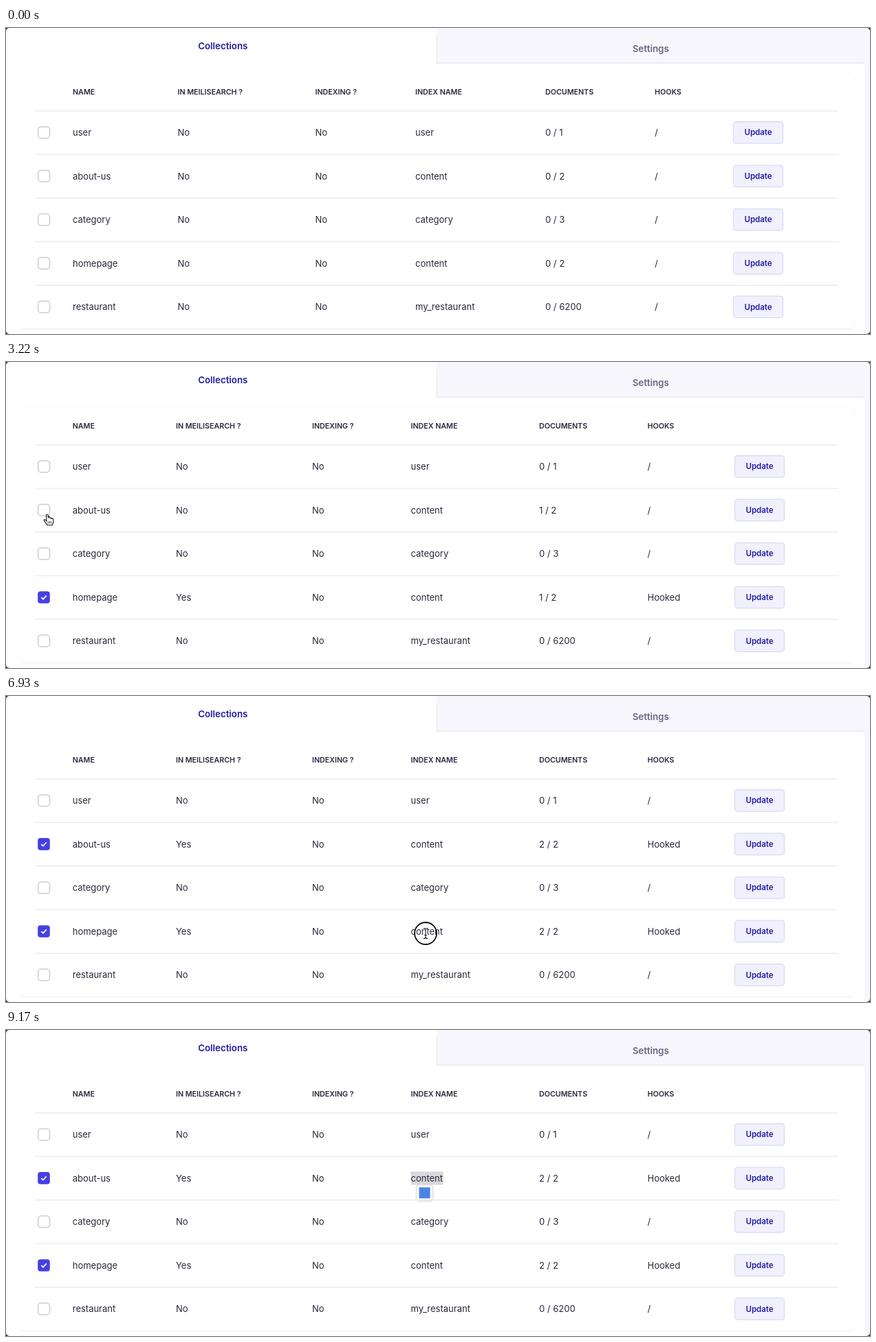
An HTML page with a canvas for the animation above (9.52 s loop, 1256 by 446 pixels).

```html
<!DOCTYPE html>
<html lang="en">
<head>
<meta charset="utf-8">
<title>Collections</title>
<style>
  html, body { margin: 0; width: 100%; height: 100%; overflow: hidden; background: #fff; }
  canvas { display: block; width: 1256px; height: 446px; }
</style>
</head>
<body>
<canvas id="stage" width="1256" height="446"></canvas>
<script>
const ctx = document.getElementById('stage').getContext('2d');
const LOOP = 9520, STEP = 70;
const INK = '#28283c', INDIGO = '#211c9f', LAVENDER = '#f7f6fc', RULE = '#ededf3';
const FIRST_ROW = 152.3, ROW_GAP = 63.55;

const HEADERS = ['NAME', 'IN MEILISEARCH ?', 'INDEXING ?', 'INDEX NAME', 'DOCUMENTS', 'HOOKS'];
const ROWS = [
  ['user', 'user', 1],
  ['about-us', 'content', 2],
  ['category', 'category', 3],
  ['homepage', 'content', 2],
  ['restaurant', 'my_restaurant', 6200]
];
const WIDE = { columns: [97, 249.5, 449.5, 595, 784, 943], button: 1057.5 };
const TIGHT = { columns: [96.7, 247, 445, 588.5, 775, 932.5], button: 1059.5 };
const HOMEPAGE_AT = 2450, ABOUT_AT = 3780;

// Cursor tracks: time, x, y, shape from that time on
const TRACKS = [
  [
    [210, 84, 432, 'arrow'], [840, 69, 344, 'arrow'], [1120, 62, 345, 'hand'],
    [1260, 60, 345, 'hand'], [1400, 52, 344, 'hand'], [1540, 37, 343, 'arrow'],
    [1680, 53, 342, 'hand'], [2030, 54, 342.5, 'hand'], [2660, 54, 342.5, 'arrow'],
    [3150, 60, 228, 'hand'], [3220, 60, 222, 'hand'], [3570, 57, 213, 'hand'],
    [4340, 57, 213, 'hand'], [4480, 62, 240, 'arrow'], [4900, 120, 450, 'arrow']
  ],
  [
    [5950, 649, 426, 'arrow'], [6440, 604, 339, 'beam'], [6860, 610, 346, 'beam'],
    [7350, 610, 346, 'beam'], [7420, 610, 334, 'arrow'], [7770, 609, 224, 'beam'],
    [7840, 609, 219, 'beam'], [8400, 609, 219, 'arrow'], [8540, 620, 428, 'arrow'],
    [8890, 620, 428, 'arrow'], [9170, 624, 452, 'arrow']
  ]
];
// Click rings: start, end, radius
const RINGS = [
  [2170, 2240, 29], [3570, 3640, 29],
  [6930, 7070, 16], [7140, 7210, 16], [7910, 7980, 16], [8050, 8190, 16]
];

function text(str, x, y, size, weight, color, align = 'left') {
  ctx.font = `${weight} ${size}px Inter, "Liberation Sans", sans-serif`;
  ctx.textAlign = align;
  ctx.fillStyle = color;
  ctx.fillText(str, x, y);
}

function rect(x, y, w, h, color) {
  ctx.fillStyle = color;
  ctx.fillRect(x, y, w, h);
}

function box(x, y, w, h, radius, fill, stroke, width = 1.3) {
  ctx.beginPath();
  ctx.roundRect(x, y, w, h, radius);
  if (fill) { ctx.fillStyle = fill; ctx.fill(); }
  if (stroke) { ctx.strokeStyle = stroke; ctx.lineWidth = width; ctx.stroke(); }
}

function drawPage() {
  rect(0, 0, 1256, 446, '#fff');
  rect(0, 0, 3, 446, '#fbfbfd');
  rect(1248, 0, 8, 446, LAVENDER);
  rect(626, 0, 630, 51, LAVENDER);
  rect(626, 10, 1, 42, '#e6e6ef');
  rect(626, 50.5, 622, 1.3, '#e6e6ef');
  text('Collections', 315.3, 31.4, 13.3, 600, INDIGO, 'center');
  text('Settings', 937.2, 35.2, 13.3, 600, '#666680', 'center');
  box(19.5, 66.5, 1213, 372, 5, null, '#fafafc', 1);
  rect(24, 438, 1204, 1, '#efeff4');
}

function drawCheckbox(y, checked) {
  if (!checked) {
    box(46.7, y - 8.4, 16.8, 16.8, 4, '#fff', '#cbcbd8', 1.5);
    return;
  }
  box(46.2, y - 8.8, 17.6, 17.6, 4, '#443fe6');
  ctx.beginPath();
  ctx.moveTo(51.3, y + 0.2);
  ctx.lineTo(54, y + 2.7);
  ctx.lineTo(58.8, y - 2.6);
  ctx.strokeStyle = '#fff';
  ctx.lineWidth = 1.8;
  ctx.stroke();
}

function drawSelection(row, color, icon) {
  const y = FIRST_ROW + row * ROW_GAP;
  rect(588.5, y - 9.5, 47.2, 19.3, color);
  if (!icon) return;
  const left = row === 1 ? 596.5 : 597.5;
  ctx.save();
  ctx.shadowColor = 'rgba(0,0,0,.16)';
  ctx.shadowBlur = 3;
  ctx.shadowOffsetY = 1;
  box(left, y + 10, 24, 23, 3, '#fafafa');
  ctx.restore();
  box(left, y + 10, 24, 23, 3, null, '#dedee2', 1);
  rect(left + 4, y + 13.5, 16, 16, '#4d83e6');
}

function drawSelections(t) {
  if (t >= 7140 && t < 7980) drawSelection(3, '#b3d6fd', t >= 7280);
  if (t >= 8050) drawSelection(1, t >= 9170 ? '#d9d9dc' : '#b3d6fd', t >= 8400);
}

function drawTable(t) {
  const { columns, button } = t < HOMEPAGE_AT ? WIDE : TIGHT;
  const checked = { 'homepage': t >= HOMEPAGE_AT, 'about-us': t >= ABOUT_AT };
  const indexed = checked['homepage'] + checked['about-us'];

  HEADERS.forEach((label, i) => text(label, columns[i], 97.3, 10.7, 600, INK));
  ROWS.forEach(([name, index, total], i) => {
    const y = FIRST_ROW + i * ROW_GAP;
    const on = checked[name];
    const done = index === 'content' ? indexed : 0;
    rect(42, y - 32.3, 1168, 1.6, RULE);
    drawCheckbox(y, on);
    [name, on ? 'Yes' : 'No', 'No', index, `${done} / ${total}`, on ? 'Hooked' : '/']
      .forEach((cell, c) => text(cell, columns[c], y + 4.9, 13, 400, INK));
    box(button, y - 15.8, 72, 31.6, 4, '#f1f0fd', '#dcdbf2');
    text('Update', button + 36, y + 4, 11.4, 600, INDIGO, 'center');
  });
}

const arrowPath = new Path2D('M0 0V13.2L3 10.5L5.1 15.3L7.4 14.3L5.3 9.7H9.4Z');
const handPath = new Path2D('M-1.5 1.3C-1.5-.5 1-.5 1.1 1.3L1.5 5.3C2-.0 4 5 4.2 6C5 4.8 6.4 5.3 6.6 6.6' +
  'C7.6 5.7 8.8 6.3 8.8 7.8V11C8.8 13 7.5 13.6 7.3 15.8H-.2C-.6 13.5-3.5 11.2-4.6 9.3C-5.4 7.8-3.8 7.2-2.8 8.2L-1 9.8Z');
const knucklePath = new Path2D('M1.2 10.3V13.3M3.4 10.3V13.3M5.6 10.3V13.3');
const beamPath = new Path2D('M-3.2-7.5Q0-7.5 0-5.5Q0-7.5 3.2-7.5M0-5.5V5.5M-3.2 7.5Q0 7.5 0 5.5Q0 7.5 3.2 7.5M-1.8 2.5H1.8');

function strokePath(path, color, width) {
  ctx.strokeStyle = color;
  ctx.lineWidth = width;
  ctx.stroke(path);
}

const shapes = {
  arrow() {
    strokePath(arrowPath, '#fff', 2);
    ctx.fillStyle = '#000';
    ctx.fill(arrowPath);
  },
  hand() {
    ctx.fillStyle = '#fff';
    ctx.fill(handPath);
    strokePath(handPath, '#111', 1.1);
    strokePath(knucklePath, '#111', 0.9);
  },
  beam() {
    strokePath(beamPath, '#fff', 2.6);
    strokePath(beamPath, '#111', 1.1);
  }
};

function cursorAt(t) {
  const track = TRACKS.find(keys => t >= keys[0][0] && t < keys[keys.length - 1][0]);
  if (!track) return null;
  const next = track.findIndex(key => key[0] > t);
  const [t0, x0, y0, shape] = track[next - 1];
  const [t1, x1, y1] = track[next];
  const p = (t - t0) / (t1 - t0);
  const ease = Math.sin(p * Math.PI / 2);
  return { x: x0 + (x1 - x0) * ease, y: y0 + (y1 - y0) * ease, shape };
}

function drawCursor(t) {
  const cursor = cursorAt(t);
  if (!cursor) return;
  ctx.save();
  ctx.translate(cursor.x, cursor.y);
  ctx.lineJoin = 'round';
  shapes[cursor.shape]();
  const ring = RINGS.find(([from, to]) => t >= from && t < to);
  if (ring) {
    ctx.beginPath();
    ctx.arc(0, 0, ring[2], 0, Math.PI * 2);
    ctx.strokeStyle = '#111';
    ctx.lineWidth = 1.8;
    ctx.stroke();
  }
  ctx.restore();
}

function drawCorners() {
  ctx.beginPath();
  ctx.rect(0, 0, 1256, 446);
  ctx.roundRect(0, 0, 1256, 446, 5);
  ctx.fillStyle = '#3a3a42';
  ctx.fill('evenodd');
}

function frame() {
  const t = Math.floor((performance.now() % LOOP) / STEP) * STEP;
  drawPage();
  drawSelections(t);
  drawTable(t);
  drawCursor(t);
  drawCorners();
  requestAnimationFrame(frame);
}
frame();
</script>
</body>
</html>
```
